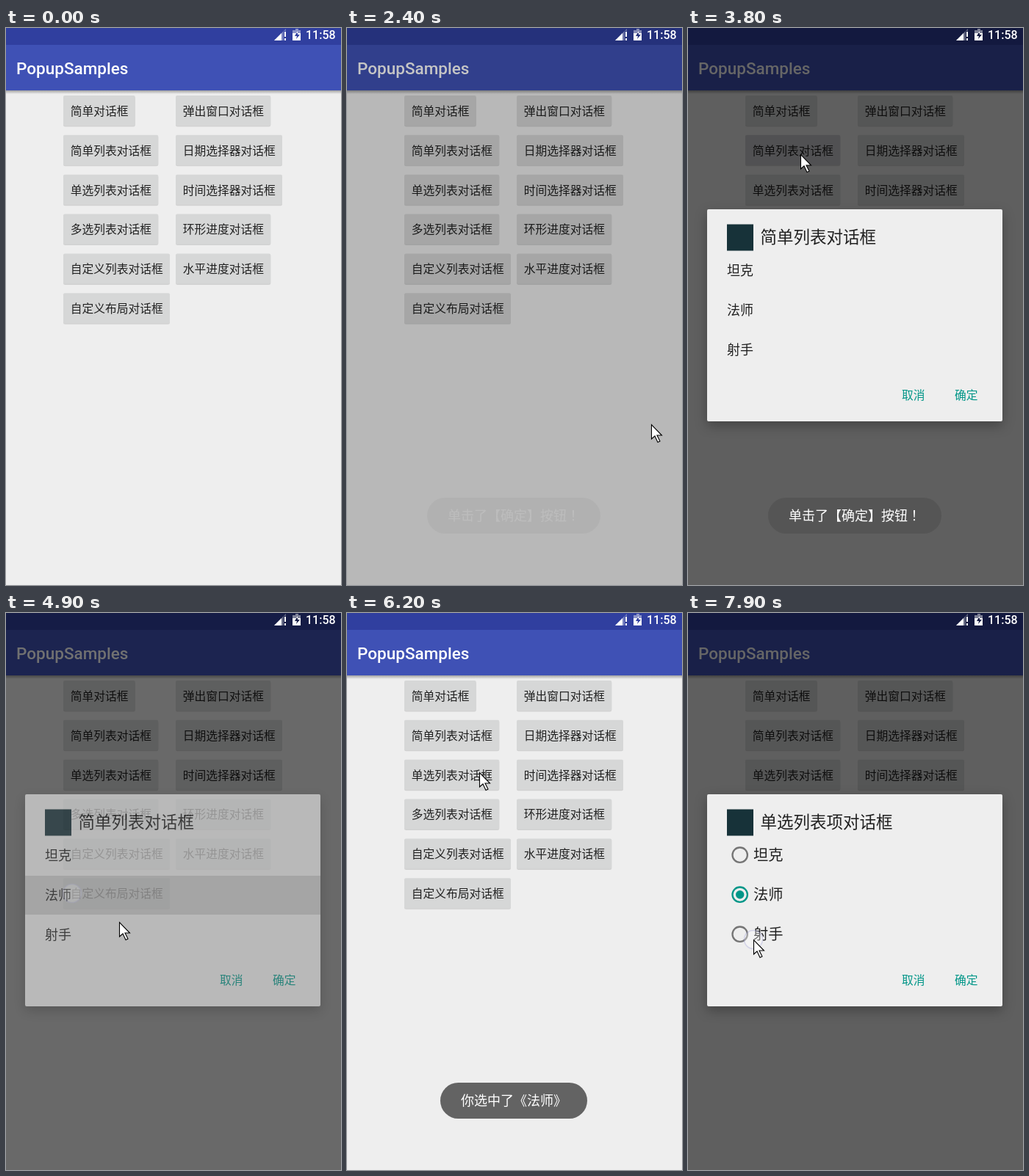
These frames come from a looping animation (456x759 px, 8 s). An HTML page:

```html
<!DOCTYPE html>
<html lang="zh-CN">
<head>
<meta charset="utf-8">
<title>PopupSamples</title>
<style>
  html, body { margin: 0; width: 100%; height: 100%; overflow: hidden; background: #eee; }
  svg { display: block; width: 100%; height: 100%; }
  text { font-family: Roboto, "Noto Sans CJK SC", "Noto Sans CJK", sans-serif; white-space: pre; }
  .toast text { font-family: "Noto Sans CJK TC", "Noto Sans CJK", sans-serif; }
  .dialog { filter: drop-shadow(0 6px 8px rgba(0, 0, 0, .28)); }
</style>
</head>
<body>
<svg id="stage" viewBox="0 0 456 759">
  <defs>
    <linearGradient id="barShadow" x2="0" y2="1">
      <stop stop-opacity=".32"/><stop offset="1" stop-opacity="0"/>
    </linearGradient>
  </defs>
</svg>
<script>
const LOOP = 8000, STEP = 100;
const TEAL = '#009688', INK = '#212121';
const stage = document.getElementById('stage');

function add(parent, tag, attrs = {}) {
  const node = document.createElementNS('http://www.w3.org/2000/svg', tag);
  for (const key in attrs) node.setAttribute(key, attrs[key]);
  parent.append(node);
  return node;
}
const group = (parent, attrs) => add(parent, 'g', attrs);
const rect = (parent, x, y, width, height, fill, rx = 0) =>
  add(parent, 'rect', { x, y, width, height, fill, rx });

// Places a line of text by its left edge and the middle of its glyphs.
function label(parent, string, x, middle, size, fill = INK, weight = 400) {
  const node = add(parent, 'text', { x, y: middle + size * .37, fill, 'font-size': size, 'font-weight': weight });
  node.textContent = string;
  return node;
}

// Page
rect(stage, 0, 0, 456, 759, '#eee');
rect(stage, 0, 85, 456, 5, 'url(#barShadow)');
rect(stage, 0, 0, 456, 85, '#3f51b5');
rect(stage, 0, 0, 456, 23, '#303f9f');
label(stage, 'PopupSamples', 14, 54.8, 22.5, '#fff', 500);

function buttonColumn(x, names) {
  return names.map((name, row) => {
    const y = 92 + row * 53.85, width = name.length * 15.75 + 19;
    rect(stage, x, y + 1, width, 41.5, 'rgba(0,0,0,.12)', 2.5);
    const face = rect(stage, x, y, width, 41.2, '#d6d7d7', 2);
    label(stage, name, x + 9.7, y + 21, 15.75);
    return face;
  });
}
const buttons = buttonColumn(78,
  ['简单对话框', '简单列表对话框', '单选列表对话框', '多选列表对话框', '自定义列表对话框', '自定义布局对话框']);
buttonColumn(231,
  ['弹出窗口对话框', '日期选择器对话框', '时间选择器对话框', '环形进度对话框', '水平进度对话框']);

const dim = rect(stage, 0, 0, 456, 759, '#000');

// Dialogs
function dialog(top, height, title) {
  const box = group(stage, { class: 'dialog' });
  rect(box, 26, top, 402, height, '#eee', 2);
  rect(box, 53, top + 20.5, 36, 36, '#173239');
  label(box, title, 98.5, top + 38, 22.5);
  label(box, '取消', 291, top + height - 36, 15.75, TEAL);
  label(box, '确定', 363, top + height - 36, 15.75, TEAL);
  return box;
}
const roles = ['坦克', '法师', '射手'];
const roleY = i => 330 + i * 54;

const simple = dialog(295, 194, '简单对话框');
label(simple, '对话框的测试内容', 53, 384, 18);
label(simple, '第二行内容', 53, 405, 18);

const list = dialog(247, 289, '简单列表对话框');
const rowPress = rect(list, 26, 358, 402, 53, 'rgba(0,0,0,.14)');
roles.forEach((role, i) => label(list, role, 53, roleY(i), 18));

const choice = dialog(247, 289, '单选列表项对话框');
roles.forEach((role, i) => {
  const chosen = i === 1, dot = { cx: 70.7, cy: roleY(i) - .3 };
  add(choice, 'circle', { ...dot, r: 10.2, fill: 'none', stroke: chosen ? TEAL : '#757575', 'stroke-width': 2.3 });
  if (chosen) add(choice, 'circle', { ...dot, r: 5.7, fill: TEAL });
  label(choice, role, 89, roleY(i), 20.25);
});

// Toasts are centred pills sized by their text
function toast(string) {
  const width = string.length * 18 + 56, x = 227 - width / 2;
  const box = group(stage, { class: 'toast', lang: 'zh-TW' });
  rect(box, x, 640, width, 49, 'rgba(85,85,85,.9)', 24.5);
  label(box, string, x + 28, 664.5, 18, '#fff');
  return box;
}
const confirmToast = toast('单击了【确定】按钮！');
const pickToast = toast('你选中了《法师》');

// Status icons stay above the dimming layer
const status = group(stage, { fill: '#fff' });
add(status, 'path', { d: 'M365 17L381 1V4H378V17Z', opacity: .35 });
add(status, 'path', { d: 'M365 17L375 7V17Z' });
add(status, 'path', { d: 'M379 5h2v7h-2zM379 14h2v3h-2z' });
add(status, 'path', { d: 'M394 1h4v2h3v4h-11v-4h4z', opacity: .45 });
add(status, 'path', { d: 'M390 7h11v10h-11zM397 4l-4 7h3l-1 4 5-6h-3z', 'fill-rule': 'evenodd' });
label(status, '11:58', 408, 9.2, 16, '#fff', 500);

// Pointer
const touch = add(stage, 'circle', {
  r: 12.5, fill: 'rgba(255,255,255,.55)', stroke: 'rgba(165,165,220,.6)', 'stroke-width': 1.6
});
const pointer = add(stage, 'path', {
  d: 'M.5 .5V20L5 16L9 24.500L12 23L8 15H14.500Z', fill: '#fff', stroke: '#000', 'stroke-width': 1.1
});

// Motion
const ramp = (t, start, span) => Math.min(1, Math.max(0, (t - start) / span));
const ease = (t, start, span) => {
  const k = ramp(t, start, span);
  return k * k * (3 - 2 * k);
};

const windows = [
  { box: simple, open: 1120, close: 2260 },
  { box: list, open: 3620, close: 4860 },
  { box: choice, open: 6720, close: LOOP }
];
const toasts = [{ box: confirmToast, open: 2380 }, { box: pickToast, open: 4970 }];
const presses = [
  { at: 900, button: 0 }, { at: 2100 }, { at: 3500, button: 1 },
  { at: 4700 }, { at: 6600, button: 2 }, { at: 7800 }
];
const ROW_PRESSED = 4800;

const home = { x: 438, y: 100 };
const moves = [
  { from: 300, to: 900, x: 122, y: 112 },
  { from: 1000, to: 1200, x: 144, y: 135 },
  { from: 1200, to: 1900, x: 378, y: 452 },
  { from: 2200, to: 2400, x: 414, y: 540 },
  { from: 2500, to: 3300, x: 153, y: 172 },
  { from: 3900, to: 4500, x: 90, y: 382 },
  { from: 4800, to: 4900, x: 154, y: 421 },
  { from: 4900, to: 5500, x: 250, y: 383 },
  { from: 5700, to: 6200, x: 180, y: 217 },
  { from: 6800, to: 7700, x: 89, y: 445 }
];

function pointerAt(t) {
  let { x, y } = home;
  for (const move of moves) {
    const k = ease(t, move.from, move.to - move.from);
    x += (move.x - x) * k;
    y += (move.y - y) * k;
  }
  return { x, y };
}

function show(node, alpha) {
  node.style.opacity = alpha;
  node.style.display = alpha > 0 ? '' : 'none';
}

function render(t) {
  let shade = 0;
  for (const { box, open, close } of windows) {
    show(box, ramp(t, open, 86) - ramp(t, close, 100));
    shade += .6 * (ease(t, open, 150) - ease(t, close, 240));
  }
  show(dim, shade);
  for (const { box, open } of toasts) show(box, ramp(t, open, 300) - ramp(t, open + 1950, 200));
  show(rowPress, t >= ROW_PRESSED ? 1 : 0);

  const press = presses.findLast(p => t >= p.at);
  const age = press ? t - press.at : Infinity;
  buttons.forEach((face, i) =>
    face.setAttribute('fill', press?.button === i && age < 400 ? '#ccccd0' : '#d6d7d7'));

  const spot = pointerAt(press ? press.at : 0);
  touch.setAttribute('cx', spot.x);
  touch.setAttribute('cy', spot.y);
  show(touch, .9 * (1 - ramp(age, 0, 300)));

  const { x, y } = pointerAt(t);
  pointer.setAttribute('transform', `translate(${x} ${y})`);
  show(pointer, t >= 300 ? 1 : 0);
}

const start = performance.now();
function tick() {
  const t = (performance.now() - start) % LOOP;
  render(Math.floor(t / STEP) * STEP);
  requestAnimationFrame(tick);
}
tick();
</script>
</body>
</html>
```
